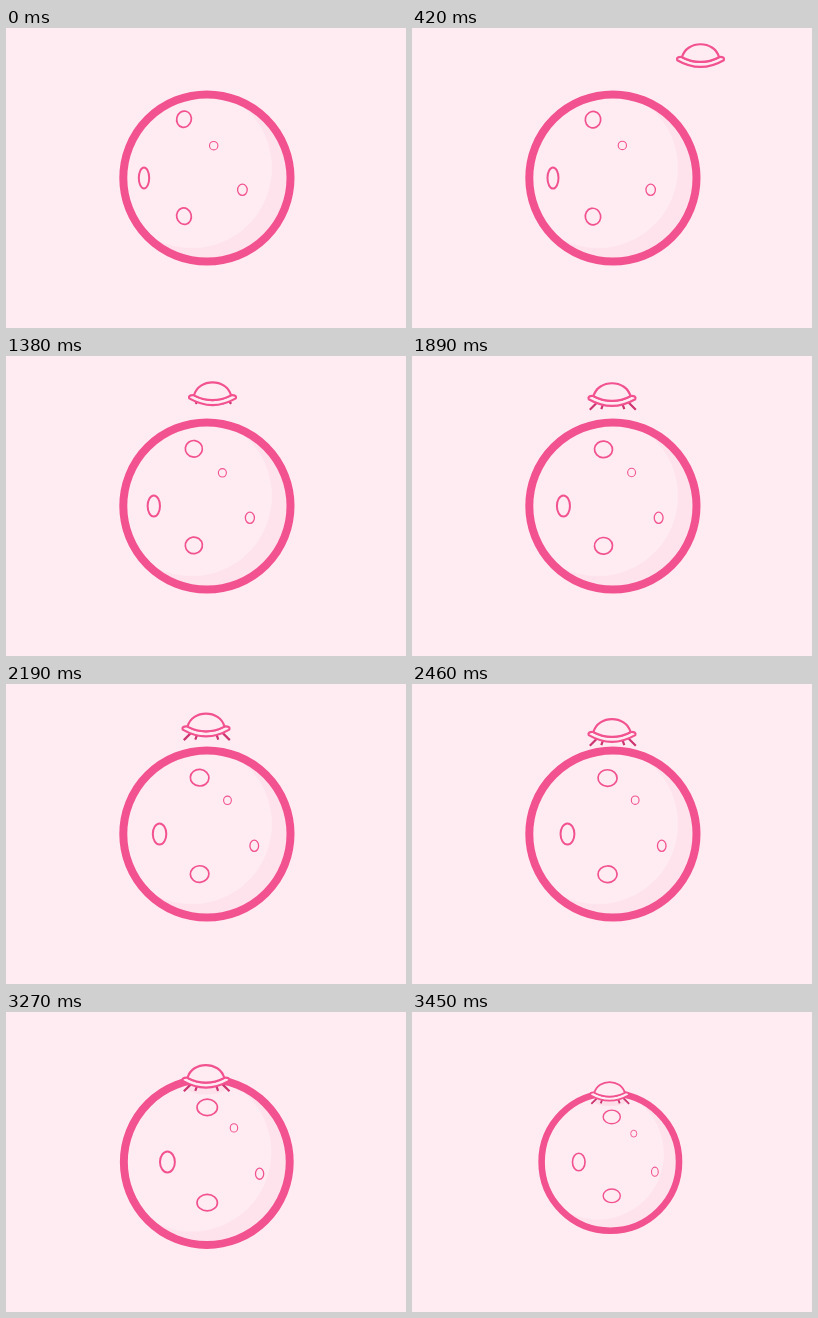
Animation, 400 px wide and 300 px high, one loop 3.63 s. Source, as an HTML page with a canvas:

```html
<!DOCTYPE html>
<html lang="en">
<head>
<meta charset="utf-8">
<title>Saucer landing</title>
<style>
  html, body { margin: 0; width: 100%; height: 100%; overflow: hidden; background: #feecf2; }
  canvas { display: block; width: 400px; height: 300px; }
</style>
</head>
<body>
<canvas id="stage" width="400" height="300"></canvas>
<script>
const ctx = document.getElementById('stage').getContext('2d');
const PALE = '#feecf2', SHADE = '#fee3ed', PINK = '#f2528f', DARK = '#cc3571';
const LOOP = 3630, STEP = 30, LAST = 3450, TAU = Math.PI * 2;
const PLANET = { x: 200.9, y: 150, r: 83.6 };

// Start and end ellipses (x, y, rx, ry) of the slow planet rotation, with line width.
const craters = [
  { from: [138, 150, 5.2, 10.5], to: [159.1, 150, 7.3, 10.6], line: 2 },
  { from: [178, 91.2, 7.3, 8.2], to: [199.2, 94.6, 10, 8.3], line: 1.7, tilt: 0.25 },
  { from: [207.7, 117.7, 4.2, 4.2], to: [226.4, 115.8, 3.8, 4.2], line: 1.1 },
  { from: [236.4, 161.8, 4.8, 5.6], to: [252.5, 161.8, 4.2, 5.6], line: 1.3 },
  { from: [178, 188.2, 7.3, 8.3], to: [199.2, 190.7, 10, 8.3], line: 1.7, tilt: -0.25 }
];

const clamp = v => Math.min(1, Math.max(0, v));
const span = (t, a, b) => clamp((t - a) / (b - a));
const easeInOut = p => (1 - Math.cos(Math.PI * p)) / 2;

function disc(x, y, r, color) {
  ctx.beginPath();
  ctx.arc(x, y, r, 0, TAU);
  ctx.fillStyle = color;
  ctx.fill();
}

function drawPlanet(t, landing) {
  const { x, y, r } = PLANET;
  ctx.save();
  ctx.beginPath();
  ctx.arc(x, y, r, 0, TAU);
  ctx.clip();
  disc(x, y, r, SHADE);
  disc(186, 140, 80, PALE);
  ctx.globalAlpha = 0.5 * landing;
  ctx.beginPath();
  ctx.ellipse(200.5, 75, 20, 7, 0, 0, TAU);
  ctx.fillStyle = '#fbd0e0';
  ctx.fill();
  ctx.restore();

  ctx.strokeStyle = PINK;
  const turn = t / 2970;
  for (const c of craters) {
    const [cx, cy, rx, ry] = c.from.map((v, i) => v + (c.to[i] - v) * turn);
    const tilt = (c.tilt || 0) * clamp(1 - turn);
    ctx.lineWidth = c.line;
    ctx.beginPath();
    ctx.ellipse(cx, cy, rx, ry, tilt, 0, TAU);
    ctx.stroke();
  }

  ctx.lineWidth = 8;
  ctx.beginPath();
  ctx.arc(x, y, r, 0, TAU);
  ctx.stroke();
}

function drawLegs(extend) {
  if (extend <= 0) return;
  ctx.strokeStyle = DARK;
  ctx.lineWidth = 2.2;
  ctx.beginPath();
  for (const side of [-1, 1]) {
    const leg = (x1, y1, x2, y2) => {
      ctx.moveTo(0.8 + side * x1, y1);
      ctx.lineTo(0.8 + side * (x1 + (x2 - x1) * extend), y1 + (y2 - y1) * extend);
    };
    leg(16, 19.5, 23, 26.5);
    leg(9.5, 20.5, 11.5, 26);
  }
  ctx.stroke();
}

function drawSaucer(x, top, legs) {
  ctx.save();
  ctx.translate(x, top);
  ctx.lineJoin = 'round';
  drawLegs(legs);
  ctx.fillStyle = PALE;
  ctx.strokeStyle = PINK;
  ctx.lineWidth = 2.2;

  ctx.beginPath();
  ctx.moveTo(-19, 12.7);
  ctx.quadraticCurveTo(0, 22.8, 19, 12.7);
  ctx.quadraticCurveTo(24.6, 12.5, 23.3, 16);
  ctx.quadraticCurveTo(0, 29.4, -23.3, 16);
  ctx.quadraticCurveTo(-24.6, 12.5, -19, 12.7);
  ctx.fill();
  ctx.stroke();

  ctx.beginPath();
  ctx.moveTo(-18.5, 13);
  ctx.bezierCurveTo(-14, -4.3, 14, -4.3, 18.5, 13);
  ctx.quadraticCurveTo(0, 22.5, -18.5, 13);
  ctx.fill();
  ctx.stroke();
  ctx.restore();
}

function draw(t) {
  const offset = Math.max(0, 246.3 * Math.exp(-0.002357 * t) - 3);
  const descent = easeInOut(span(t, 1890, 3400));
  const zoom = 1 - 0.178 * Math.pow(span(t, 3240, LAST), 1.6);

  ctx.fillStyle = PALE;
  ctx.fillRect(0, 0, 400, 300);
  ctx.save();
  ctx.translate(186.4, 150);
  ctx.scale(zoom, zoom);
  ctx.translate(-186.4, -150);
  drawPlanet(t, span(t, 2700, 3400));
  drawSaucer(200 + offset, 27.2 - 0.124 * offset + 25.5 * descent,
             easeInOut(span(t, 1150, 1800)));
  ctx.restore();
}

let start;
function tick(now) {
  if (start === undefined) start = now;
  const t = (now - start) % LOOP;
  draw(Math.min(LAST, Math.floor(t / STEP) * STEP));
  requestAnimationFrame(tick);
}
draw(0);
requestAnimationFrame(tick);
</script>
</body>
</html>
```
